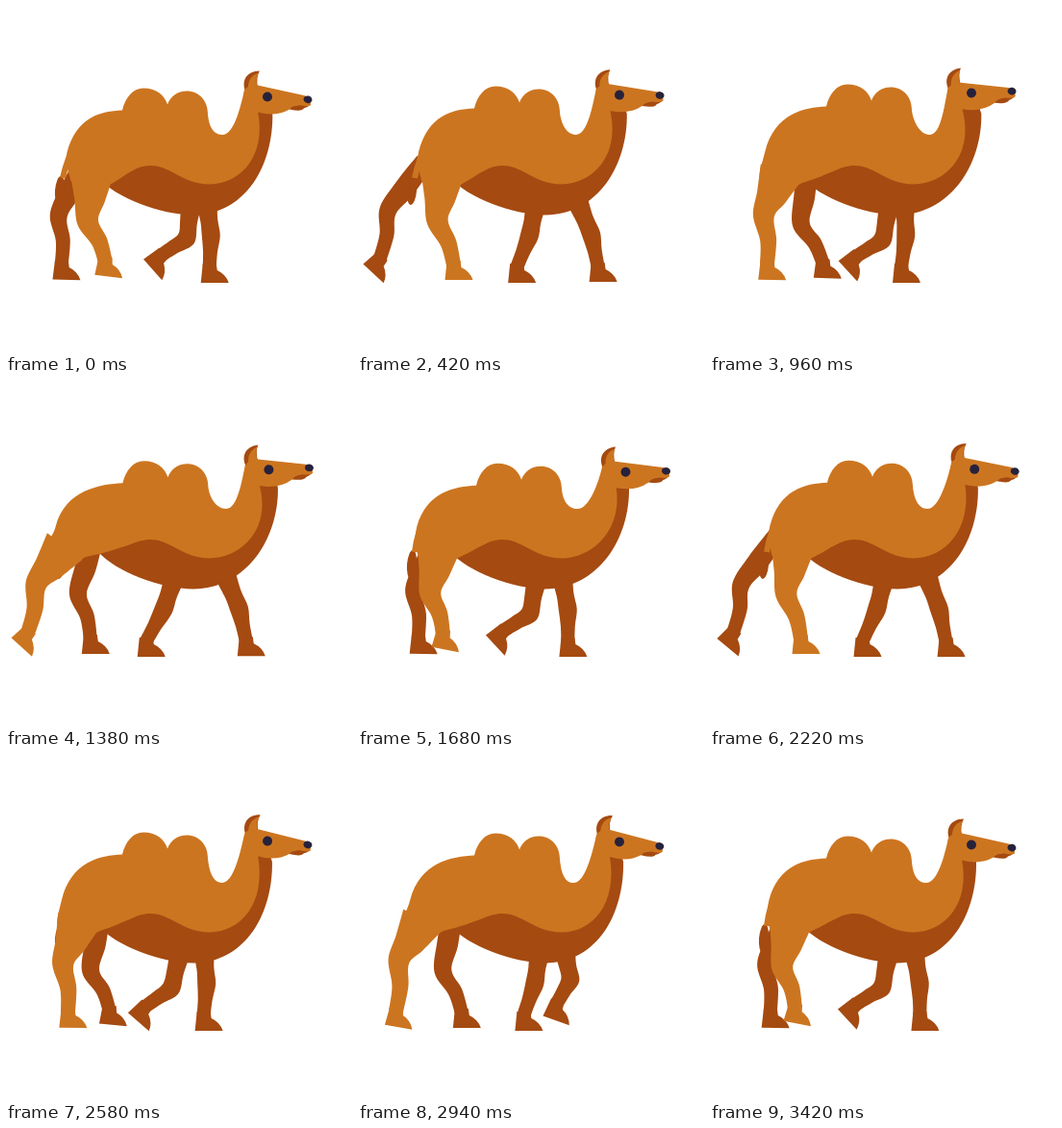
These frames come from a looping animation (360 px wide and 360 px high, 3.48 s). An HTML page with a canvas:

```html
<!DOCTYPE html>
<html lang="en">
<head>
<meta charset="utf-8">
<title>Walking camel</title>
<style>
  html, body { margin: 0; width: 100%; height: 100%; overflow: hidden; background: #fff; }
  canvas { display: block; width: 100vw; height: 100vh; }
</style>
</head>
<body>
<canvas id="stage" width="360" height="360"></canvas>
<script>
const ctx = document.getElementById('stage').getContext('2d');
const LOOP = 3480, STRIDE = LOOP / 2;
const TICK = 60, STEP = LOOP / 42;
const COAT = '#cc7520', SHADE = '#a54a11', INK = '#27223c';
const TAU = 2 * Math.PI;

const lerp = (a, b, u) => a + (b - a) * u;
const mix = (p, q, u) => [lerp(p[0], q[0], u), lerp(p[1], q[1], u)];
const smooth = u => u * u * (3 - 2 * u);
const wave = (t, peak, period) => Math.cos(TAU * (t - peak) / period);

// A foot glides back while planted, then swings forward: both run from 0 to 1.
function gait(t, landing, stance) {
  const age = (t - landing + LOOP) % STRIDE;
  return {
    planted: Math.min(1, age / stance),
    swing: Math.max(0, (age - stance) / (STRIDE - stance))
  };
}

function frontPose(t, landing) {
  const { planted, swing } = gait(t, landing, 1010);
  const arc = Math.sin(Math.PI * swing);
  const reach = swing ? smooth(swing) ** 1.5 : 1 - planted;
  const x = lerp(138, 250, reach);
  const hipX = lerp(172, 228, reach) + 10 * arc;
  return {
    hip: [hipX, 204],
    knee: [(hipX + x) / 2 + 3 + 8 * arc, 239 + 5 * Math.sin(TAU * swing)],
    ankle: [x, 272 - 13 * arc],
    hoof: .85 * Math.sin(Math.PI * Math.min(1, swing / .75)),
    bow: 0
  };
}

function hindPose(t, landing, hipShift = 0, hipY = 173) {
  const { planted, swing } = gait(t, landing, 1200);
  const reach = swing ? smooth(swing) : 1 - planted;
  const x = lerp(22, 122, reach);
  const hipX = lerp(61, 96, reach);
  const hoof = .8 * (swing ? (1 - swing) ** 1.5 : planted ** 8);
  return {
    hip: [hipX + hipShift, hipY],
    knee: [(hipX + x) / 2 - 11, lerp(213, 228, reach)],
    ankle: [x, 269 - 8 * hoof - 4 * Math.sin(Math.PI * swing)],
    hoof,
    bow: 3
  };
}

function bodyPose(t, hipX) {
  const sway = Math.max(0, wave(t, 1860, LOOP)) ** 4;
  const lift = 2 * wave(t, 0, STRIDE) - 1.5 + 1.5 * sway;
  return {
    hipX,
    rump: 26 + .42 * hipX,
    headX: 8 * sway,
    humpX: 2.5 * sway,
    lift,
    tilt: -.045 + .08 * wave(t, 2900, LOOP),
    chest: 2.5 + 3.5 * wave(t, 1250, LOOP)
  };
}

function fillShape(color, trace) {
  ctx.fillStyle = color;
  ctx.beginPath();
  trace();
  ctx.closePath();
  ctx.fill();
}

const ellipse = (color, ...shape) =>
  fillShape(color, () => ctx.ellipse(...shape, 0, TAU));

// Curve that passes through every point.
function splineTo(points) {
  const at = i => points[Math.max(0, Math.min(points.length - 1, i))];
  ctx.lineTo(...points[0]);
  for (let i = 0; i < points.length - 1; i++) {
    const [a, b, c, d] = [at(i - 1), at(i), at(i + 1), at(i + 2)];
    ctx.bezierCurveTo(b[0] + (c[0] - a[0]) / 6, b[1] + (c[1] - a[1]) / 6,
      c[0] - (d[0] - b[0]) / 6, c[1] - (d[1] - b[1]) / 6, ...c);
  }
}

function drawLeg(color, widths, { hip, knee, ankle, hoof, bow }) {
  const shin = mix(knee, ankle, .5);
  shin[0] += bow;
  const spine = [hip, mix(hip, knee, .55), knee, shin, ankle];
  const side = sign => spine.map(([x, y], i) => {
    const a = spine[Math.max(i - 1, 0)], b = spine[Math.min(i + 1, 4)];
    const dx = b[0] - a[0], dy = b[1] - a[1];
    const w = sign * widths[i] / Math.hypot(dx, dy);
    return [x - dy * w, y + dx * w];
  });
  fillShape(color, () => {
    splineTo(side(1));
    splineTo(side(-1).reverse());
  });
  ctx.save();
  ctx.translate(...ankle);
  ctx.rotate(hoof);
  fillShape(color, () => {
    ctx.moveTo(-7, -4);
    ctx.lineTo(-9, 16);
    ctx.lineTo(20, 16);
    ctx.quadraticCurveTo(17, 7, 8, 3);
    ctx.lineTo(7, -4);
  });
  ctx.restore();
}

function drawTail({ rump }) {
  ellipse(SHADE, 56, 192, 5, 15, .08);
  ctx.strokeStyle = COAT;
  ctx.lineWidth = 6;
  ctx.beginPath();
  ctx.moveTo(rump + 9, 143);
  ctx.quadraticCurveTo(rump, 158, 59, 179);
  ctx.stroke();
}

function drawBelly({ chest }) {
  fillShape(SHADE, () => {
    ctx.moveTo(95, 178);
    ctx.bezierCurveTo(115, 200, 160, 217, 195, 217.5);
    ctx.bezierCurveTo(250, 217, 278 + chest, 165, 277 + chest, 112);
    ctx.lineTo(275 + chest, 106);
    ctx.lineTo(260, 106);
    ctx.lineTo(245, 160);
    ctx.lineTo(150, 160);
  });
}

function drawTorso({ hipX, rump, headX, humpX, lift, chest }) {
  const hump = (...c) =>
    ctx.bezierCurveTo(...c.map((v, i) => v + (i % 2 ? lift : humpX)));
  const neck = 225 + chest * .7;
  fillShape(COAT, () => {
    ctx.moveTo(248 + headX, 87 + lift);
    ctx.bezierCurveTo(244 + headX, 105 + lift, neck + 12, 134, neck, 134);
    ctx.bezierCurveTo(neck - 11, 134, 211 + humpX, 122 + lift, 210 + humpX, 112 + lift);
    hump(210, 98, 201, 88, 188, 88);
    hump(178, 88, 171, 94, 168, 102);
    hump(165, 92, 156, 85, 143, 85);
    hump(132, 85, 124, 95, 121, 108);
    ctx.bezierCurveTo(98 + humpX, 109 + lift, rump + 10, 115 + lift, rump, 152);
    ctx.bezierCurveTo(rump - 3, 165, hipX - 24, 172, hipX - 22, 182);
    ctx.lineTo(hipX, 195);
    ctx.lineTo(hipX + 22, 184);
    ctx.bezierCurveTo(126, 175, 136, 166, 150, 166);
    ctx.bezierCurveTo(172, 166, 182, 185, 212, 185.5);
    ctx.bezierCurveTo(244, 185, 271 + chest, 156, 262 + headX, 109 + lift);
    ctx.lineTo(262 + headX, 100 + lift);
  });
}

function drawHead({ headX, lift, tilt }) {
  ctx.save();
  ctx.translate(272 + headX, 94 + lift);
  ctx.rotate(tilt);
  ctx.translate(-272, -94);
  fillShape(SHADE, () => {
    ctx.moveTo(250, 90);
    ctx.bezierCurveTo(244, 78, 250, 67, 264, 67);
    ctx.quadraticCurveTo(260, 74, 262, 84);
  });
  fillShape(COAT, () => {
    ctx.moveTo(253, 92);
    ctx.bezierCurveTo(250, 81, 253, 72, 263, 69);
    ctx.quadraticCurveTo(259, 76, 262, 85);
  });
  fillShape(SHADE, () => {
    ctx.moveTo(293, 104);
    ctx.lineTo(317, 101);
    ctx.quadraticCurveTo(315, 105, 310, 106);
    ctx.quadraticCurveTo(308, 110, 295, 107);
  });
  fillShape(COAT, () => {
    ctx.moveTo(248, 87);
    ctx.quadraticCurveTo(252, 81, 262, 82);
    ctx.lineTo(311, 93);
    ctx.quadraticCurveTo(318, 96, 317, 103);
    ctx.quadraticCurveTo(314, 105, 306, 103);
    ctx.quadraticCurveTo(298, 103, 295, 107);
    ctx.quadraticCurveTo(281, 115, 262, 110);
    ctx.lineTo(246, 106);
  });
  ellipse(INK, 272, 94, 5, 5, 0);
  ellipse(INK, 314, 97, 4.5, 3.8, .2);
  ctx.restore();
}

// Drawings are spread evenly over the loop and snapped to whole ticks.
function heldTime(t) {
  const tick = Math.floor(t / TICK) * TICK;
  const drawing = Math.ceil((tick + TICK / 2) / STEP) - 1;
  return Math.round(drawing * STEP / TICK) * TICK;
}

function draw(now) {
  const t = heldTime(now % LOOP);
  const nearHind = hindPose(t, 150);
  const body = bodyPose(t, nearHind.hip[0]);
  const frontWidths = [11, 9, 9.5, 7.5, 7];
  ctx.fillStyle = '#fff';
  ctx.fillRect(0, 0, 360, 360);
  drawLeg(SHADE, [10, 11, 9, 7.5, 7], hindPose(t, 970, 8, 162));
  drawLeg(SHADE, frontWidths, frontPose(t, 1395));
  drawLeg(SHADE, frontWidths, frontPose(t, 440));
  drawBelly(body);
  drawTail(body);
  drawTorso(body);
  drawLeg(COAT, [23, 16, 11, 8.5, 7.5], nearHind);
  drawHead(body);
}

let begin;
function loop(now) {
  begin ??= now;
  draw(Math.max(0, now - begin));
  requestAnimationFrame(loop);
}
draw(0);
requestAnimationFrame(loop);
</script>
</body>
</html>
```
